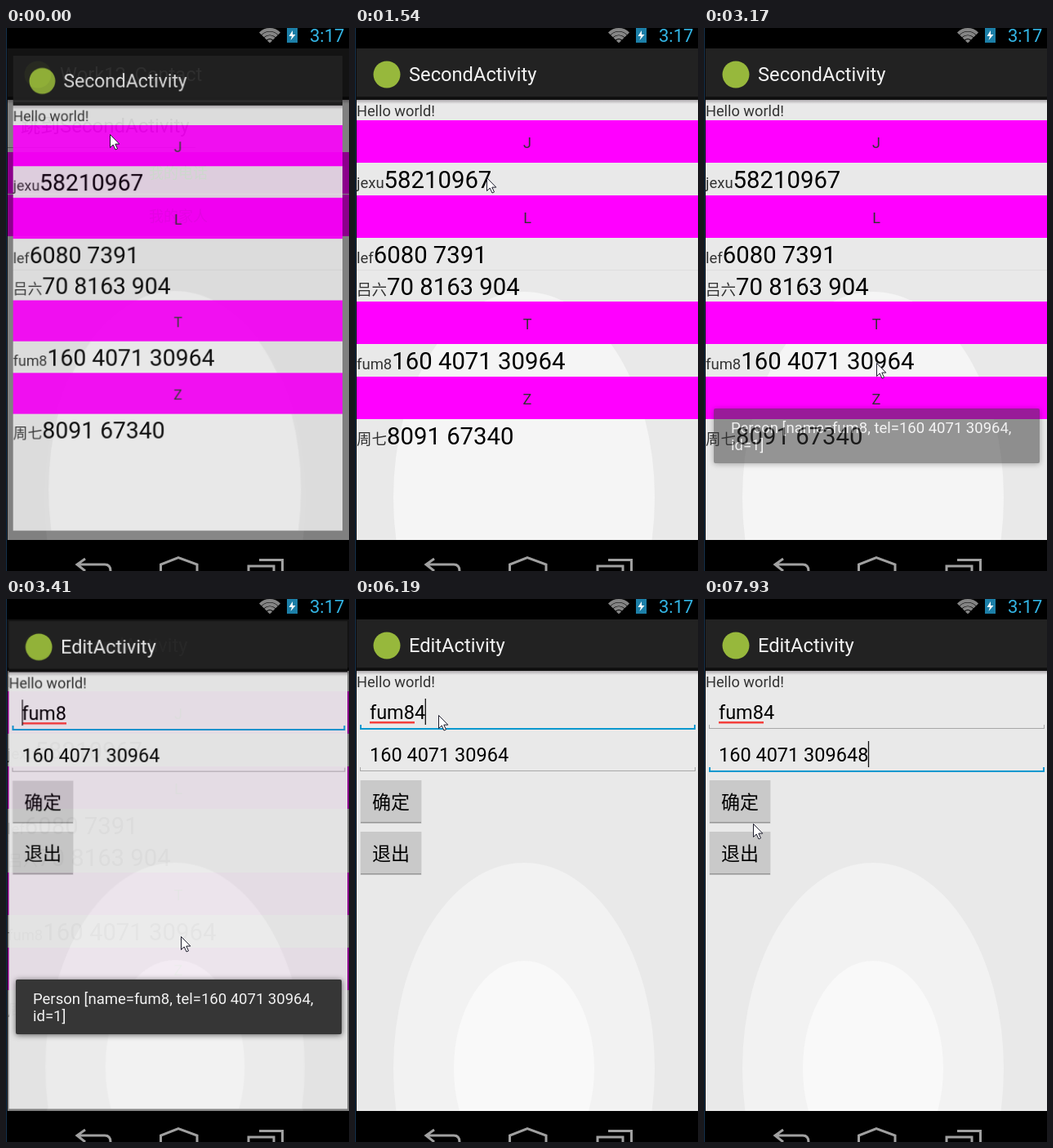
An HTML page with a canvas that plays this animation: 420x665 px, repeating every 8 s.

```html
<!DOCTYPE html>
<html lang="zh">
<head>
<meta charset="utf-8">
<title>Contacts demo</title>
<style>
html, body { margin: 0; width: 100%; height: 100%; overflow: hidden; background: #000; }
canvas { display: block; }
</style>
</head>
<body>
<canvas id="stage" width="420" height="665"></canvas>
<script>
const W = 420, H = 665, LOOP = 8000;
const MAGENTA = '#f0f', BLUE = '#0a98cf';
const stage = document.getElementById('stage').getContext('2d');
const sheet = document.createElement('canvas');
sheet.width = W;
sheet.height = H;
const sheetCtx = sheet.getContext('2d');
let c = stage;

// Bursts of screen updates: start, end, number of steps
const bursts = [[0, 0, 1], [150, 990, 7], [1540, 2500, 8], [2780, 3800, 9],
  [3920, 4640, 6], [4910, 5940, 8], [6190, 7120, 8], [7240, 7930, 6]];

// Pointer waypoints: time, x, y
const path = [[0, 127, 130], [990, 150, 190], [1540, 161, 183], [2000, 130, 290],
  [2500, 172, 406], [2780, 185, 407], [3040, 211, 410], [3170, 211, 410],
  [3417, 214, 413], [3800, 168, 277], [4640, 160, 190], [4910, 160, 177],
  [5940, 90, 140], [6190, 102, 142], [7120, 219, 186], [7240, 205, 190], [7930, 60, 275]];

const contacts = [['J', 113, [['jexu', '58210967', 196]]],
  ['L', 205, [['lef', '6080 7391', 288], ['吕六', '70 8163 904', 327]]],
  ['T', 335, [['fum8', '160 4071 30964', 418]]],
  ['Z', 427, [['周七', '8091 67340', 510]]]];

function snap(t) {
  const [start, end, n] = bursts.filter(b => t >= b[0]).pop();
  if (n < 2) return start;
  const step = (end - start) / (n - 1);
  return start + Math.min(n - 1, Math.floor((t - start) / step + 0.1)) * step;
}

function along(points, t) {
  const i = points.findIndex(p => p[0] >= t);
  if (i < 0) return points[points.length - 1].slice(1);
  if (i === 0) return points[0].slice(1);
  const a = points[i - 1], b = points[i], u = (t - a[0]) / (b[0] - a[0]);
  return a.slice(1).map((v, k) => v + (b[k + 1] - v) * u);
}

function box(x, y, w, h, color) {
  c.fillStyle = color;
  c.fillRect(x, y, w, h);
}

function text(s, x, y, size, color = '#333', align = 'left') {
  c.font = `${size}px Roboto, "Noto Sans CJK SC", "Noto Sans CJK", sans-serif`;
  c.textAlign = align;
  c.fillStyle = color;
  c.fillText(s, x, y);
  return c.measureText(s).width;
}

function oval(cy, rx, ry, color) {
  c.fillStyle = color;
  c.beginPath();
  c.ellipse(207, cy, rx, ry, 0, 0, Math.PI * 2);
  c.fill();
}

function line(d, color, width) {
  c.strokeStyle = color;
  c.lineWidth = width;
  c.stroke(new Path2D(d));
}

// Draws a part as one flat sheet, so that opacity applies to it as a whole
function layer(draw, alpha = 1, scale = 1) {
  if (alpha <= 0) return;
  c = sheetCtx;
  c.clearRect(0, 0, W, H);
  draw();
  c = stage;
  c.save();
  c.globalAlpha = alpha;
  c.translate(198, 289);
  c.scale(scale, scale);
  c.drawImage(sheet, -198, -289);
  c.restore();
}

function frame(title, ...rings) {
  c.save();
  c.beginPath();
  c.rect(2, 25, 418, 602);
  c.clip();
  box(2, 25, 418, 602, '#e9e9e9');
  oval(575, 160, 252, rings[0]);
  if (rings[1]) oval(575, 86, 132, rings[1]);
  c.restore();
  box(2, 25, 418, 60, '#222');
  box(2, 84, 418, 4, '#101010');
  const shade = c.createLinearGradient(0, 88, 0, 93);
  shade.addColorStop(0, '#aca8ac');
  shade.addColorStop(1, '#e9e9e9');
  box(2, 88, 418, 5, shade);
  c.fillStyle = '#97b83c';
  c.beginPath();
  c.arc(39, 57, 16.5, 0, Math.PI * 2);
  c.fill();
  text(title, 66, 65, 23.7, '#f3f3f3');
}

function startScreen() {
  frame('Work12_Contact', '#f5f5f5');
  text('跳到SecondActivity', 18, 128, 24, '#222');
  box(2, 146, 230, 1, '#999');
  box(2, 152, 418, 103, MAGENTA);
  box(2, 203, 418, 1, '#e9e9e9');
  text('我的电话', 211, 184, 18, '#0a0', 'center');
  text('我的家人', 211, 237, 18, '#333', 'center');
}

function listScreen() {
  frame('SecondActivity', '#f5f5f5');
  text('Hello world!', 2, 108, 18.2);
  for (const [letter, y, rows] of contacts) {
    box(2, y, 418, 52, MAGENTA);
    text(letter, 211, y + 33.5, 18, '#333', 'center');
    for (const [name, tel, base] of rows) {
      const w = text(name, 2, base, 18.5);
      text(tel, 2 + w, base, 29.3, '#000');
    }
  }
  box(2, 296, 418, 1, '#dedede');
}

function field(value, base, y, focused) {
  const color = focused ? BLUE : '#a8a8a8', h = focused ? 2 : 1;
  box(6, y, 411, h, color);
  box(6, y - 4, h, 4, color);
  box(417 - h, y - 4, h, 4, color);
  return 18 + text(value, 18, base, 23.5, '#000');
}

function button(label, y) {
  box(6, y, 76, 53, '#dcdcdc');
  box(7, y, 74, 52, '#c9c9c9');
  box(7, y + 51, 74, 1.5, '#979797');
  text(label, 44, y + 34.5, 23, '#000', 'center');
}

function editScreen(t) {
  const second = t >= 7230;
  frame('EditActivity', '#f2f2f2', '#f9f9f9');
  text('Hello world!', 2, 108, 18.2);
  const end1 = field(t >= 6180 ? 'fum84' : 'fum8', 147, 158, !second);
  box(18, 150, 55, 2.5, '#f4403c');
  const end2 = field('160 4071 30964' + (t >= 7640 ? '8' : ''), 199, 210, second);
  button('确定', 222);
  button('退出', 285);

  // The caret's blink restarts with every tap or key
  const last = [3400, 5490, 6180, 7230, 7640].filter(e => t >= e).pop();
  if (Math.floor((t - last) / 500) % 2) return;
  if (second) box(end2 - 0.5, 174, 1.3, 32, '#111');
  else box(t < 5490 ? 18 : end1 - 0.5, 122, 1.3, 32, '#111');
}

function toast() {
  c.save();
  c.shadowColor = 'rgba(0,0,0,.6)';
  c.shadowBlur = 7;
  c.shadowOffsetY = 1;
  c.fillStyle = '#363636';
  c.beginPath();
  c.roundRect(12, 466, 399, 67, 2);
  c.fill();
  c.restore();
  text('Person [name=fum8, tel=160 4071 30964,', 33, 496, 18.5, '#f2f2f2');
  text('id=1]', 33, 516.5, 18.5, '#f2f2f2');
}

// A new screen grows and fades in over the dimmed old one
function enter(from, to, age, shrink) {
  const k = Math.exp(-age / 75);
  if (k < 0.01) return layer(to);
  layer(from);
  box(0, 25, W, 602, 'rgba(0,0,0,.45)');
  layer(to, 1 - 0.3 * k, 1 - shrink * k);
}

function systemBars() {
  box(0, 0, W, 25, '#000');
  box(0, 627, W, 38, '#000');
  box(0, 25, 2, 602, '#0c0a0c');
  box(0, 0, 1, H, '#14324c');
  for (const r of [2.5, 7.5, 12, 16.5]) {
    c.strokeStyle = '#858585';
    c.lineWidth = 3.8;
    c.beginPath();
    c.arc(323, 18.5, r, -Math.PI * 0.75, -Math.PI * 0.25);
    c.stroke();
  }
  box(344, 0, 13, 18, '#1c7fa8');
  c.fillStyle = '#fff';
  c.fill(new Path2D('M351 3L346.5 10H350L348.5 15L354.5 8H351Z'));
  text('3:17', 372, 17, 22, '#33b5e5');
  line('M97 650L87 657L97 665M88 657H121Q128 657 128 665', '#a0a0a0', 3);
  line('M189.5 666V657L211 648.5L234 657V666', '#a0a0a0', 3);
  line('M310 651.5H338.5V666M297 666V659H328V666', '#a0a0a0', 3);
}

function pointer(x, y) {
  c.save();
  c.translate(Math.round(x) + 0.5, Math.round(y) + 0.5);
  const arrow = 'M0 0V16L3.7 12.5L6.5 18.5L9 17.4L6.3 11.6H11.3Z';
  c.fillStyle = '#fff';
  c.fill(new Path2D(arrow));
  line(arrow, '#1c1c2c', 1);
  c.restore();
}

function draw(now) {
  const t = snap(now % LOOP);
  box(0, 0, W, H, '#000');
  if (t < 3280) enter(startScreen, listScreen, t + 69, 0.085);
  else enter(listScreen, () => editScreen(t), t - 3290, 0.042);
  const [alpha] = along([[2950, 0], [3040, 0.12], [3162, 0.5], [3290, 1],
    [4640, 1], [4910, 0.94], [5320, 0]], t);
  layer(toast, alpha);
  systemBars();
  pointer(...along(path, t));
}

const begin = performance.now();
function tick() {
  draw(performance.now() - begin);
  requestAnimationFrame(tick);
}
tick();
</script>
</body>
</html>
```
